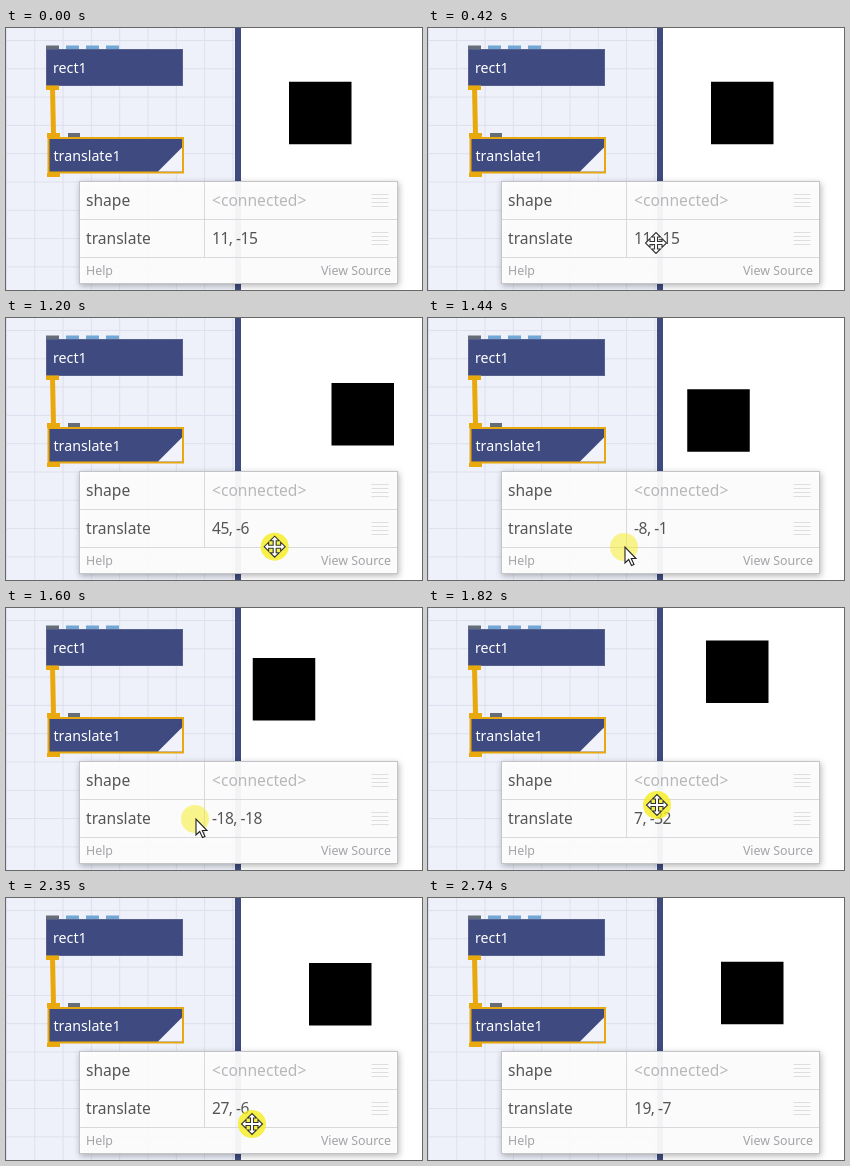
An HTML page that plays this animation: 416x262 px, repeating every 3.21 s.

```html
<!DOCTYPE html>
<html lang="en">
<head>
<meta charset="utf-8">
<title>Dragging a translate value</title>
<style>
  html, body { margin: 0; width: 100%; height: 100%; overflow: hidden; background: #fff; }
  svg { display: block; width: 416px; height: 262px; font: 15.6px "Noto Sans", sans-serif; fill: #555; }
  .node { font-size: 14.2px; font-weight: 500; fill: #fff; }
  .foot { font-size: 12.4px; fill: #a3a3a8; }
  .num { letter-spacing: -.5px; }
  .panel { filter: drop-shadow(1px 2px 3px rgba(0, 0, 0, .3)); }
</style>
</head>
<body>
<svg viewBox="0 0 416 262">
  <defs>
    <pattern id="grid" x="0" y="12" width="28.3" height="28.3" patternUnits="userSpaceOnUse">
      <path d="M0 .5H28.3M.5 0V28.3" stroke="#dde0ec" fill="none"/>
    </pattern>
    <path id="menu" d="M0 .5h17m-17 4h17m-17 4h17m-17 4h17" stroke="#dedede"/>
  </defs>

  <rect width="229" height="262" fill="#eef0fa"/>
  <rect width="229" height="262" fill="url(#grid)"/>
  <rect x="229" width="6" height="262" fill="#3f4b7d"/>
  <rect id="box" width="62.5" height="62.5" fill="#000"/>

  <path d="M40 17.5h13v4h-13zM62 105h12v4h-12z" fill="#646d78"/>
  <path d="M60 17.5h13v4h-13zm20 0h13v4h-13zm20 0h13v4h-13z" fill="#72a6d4"/>
  <rect x="40.5" y="21.5" width="136" height="36" fill="#3f4b80" stroke="#56608c"/>
  <path d="M40 57.500h13v4.500h-13zM41 105h13v5h-13zM41 145h13v4h-13z" fill="#e9a90c"/>
  <path d="M46.500 59L47.500 107" stroke="#e9a90c" stroke-width="5"/>
  <rect x="42.500" y="110" width="134.500" height="34.500" fill="#3f4b80" stroke="#e9a90c" stroke-width="2"/>
  <path d="M152 143.500L176 119.500V143.500z" fill="#f2f3fa"/>
  <text class="node" x="47" y="45">rect1</text>
  <text class="node" x="47.500" y="133">translate1</text>

  <g class="panel">
    <rect x="73.500" y="153.500" width="318" height="102" fill="#fff" fill-opacity=".94" stroke="#c4c4c8"/>
  </g>
  <path d="M74 191.500H391M74 229.500H391M198.500 154V229" stroke="#d9d9dc"/>
  <use href="#menu" x="365.500" y="166"/>
  <use href="#menu" x="365.500" y="204"/>
  <text x="80" y="178">shape</text>
  <text x="80" y="216">translate</text>
  <text x="206" y="178" fill="#b8b8ba">&lt;connected&gt;</text>
  <text id="value" class="num" x="206" y="216"></text>
  <text class="foot" x="80" y="247">Help</text>
  <text class="foot" x="385" y="247" text-anchor="end">View Source</text>

  <g id="cursor">
    <circle id="glow" r="14" fill="#f5ee1c"/>
    <path id="cross" fill="#fff" stroke="#333" stroke-width="1.100"/>
    <path id="arrow" d="M1 0V16L4.700 12.500L7.500 18.500L10 17.400L7.300 11.500H12z" fill="#fff" stroke="#222" stroke-width="1.100"/>
  </g>
</svg>
<script>
const $ = id => document.getElementById(id);
const LOOP = 3210;

// Times at which the picture is refreshed
const ticks = [0, 200, 270, 350, 420, 580, 650, 730, 800, 880, 960, 1040,
  1130, 1210, 1280, 1360, 1440, 1520, 1600, 1670, 1740, 1820, 1890, 1970, 2040, 2120,
  2200, 2270, 2350, 2420, 2500, 2670, 2740];

// time, pointer x, y, value x, y
const keys = [
  [200, 241, 222, 11, -15],
  [420, 228, 215, 11, -15],
  [580, 228, 216, 11, -15],
  [730, 240, 218, 19, -14],
  [880, 260, 211, 34, -18],
  [1040, 271, 216, 45, -16],
  [1210, 263, 240, 41, 3],
  [1280, 243, 247, 25, 9],
  [1360, 216, 243, 5, 8],
  [1440, 196, 229, -8, -1],
  [1600, 189, 211, -18, -18],
  [1740, 209, 198, -5, -29],
  [1820, 229, 197, 7, -32],
  [1970, 254, 204, 28, -25],
  [2120, 261, 214, 37, -16],
  [2350, 246, 226, 27, -6],
  [2500, 233, 225, 19, -7],
  [2670, 284, 247, 19, -7]
];

// Four-headed move pointer: one arm, turned around the centre
const arm = [[-1.5, -1.5], [-1.5, -6], [-4.5, -6], [0, -10.5], [4.5, -6], [1.5, -6]];
const turn = ([x, y], n) => n ? turn([-y, x], n - 1) : [x, y];
$("cross").setAttribute("d",
  "M" + [0, 1, 2, 3].flatMap(n => arm.map(p => turn(p, n).join(" "))).join("L") + "z");

function spline(a, b, c, d, u) {
  return b + u / 2 * (c - a + u * (2 * a - 5 * b + 4 * c - d + u * (3 * (b - c) + d - a)));
}

function pose(t) {
  const last = keys.length - 1;
  const at = i => keys[Math.max(0, Math.min(last, i))];
  let i = 0;
  while (i < last - 1 && keys[i + 1][0] <= t) i++;
  const start = at(i)[0];
  const u = Math.max(0, Math.min(1, (t - start) / (at(i + 1)[0] - start)));
  return [1, 2, 3, 4].map(n => spline(at(i - 1)[n], at(i)[n], at(i + 1)[n], at(i + 2)[n], u));
}

const show = (id, on) => $(id).setAttribute("visibility", on ? "visible" : "hidden");

function draw(now) {
  const time = now % LOOP;
  const t = ticks.filter(k => k <= time).pop();
  const [x, y, vx, vy] = pose(t);
  const tx = Math.round(vx), ty = Math.round(vy);
  const visible = t >= 200 && t < 2740;
  const inField = x > 198 && y < 229;

  $("value").textContent = `${tx}, ${ty}`;
  $("box").setAttribute("x", 269.25 + 1.25 * tx);
  $("box").setAttribute("y", 72.5 + 1.25 * ty);
  $("cursor").setAttribute("transform", `translate(${x} ${y})`);
  $("glow").setAttribute("opacity", inField ? .8 : .5);
  show("glow", t >= 580 && t < 2500);
  show("cross", visible && inField);
  show("arrow", visible && !inField);
}

const origin = performance.now();
function frame() {
  draw(performance.now() - origin);
  requestAnimationFrame(frame);
}
frame();
</script>
</body>
</html>
```
